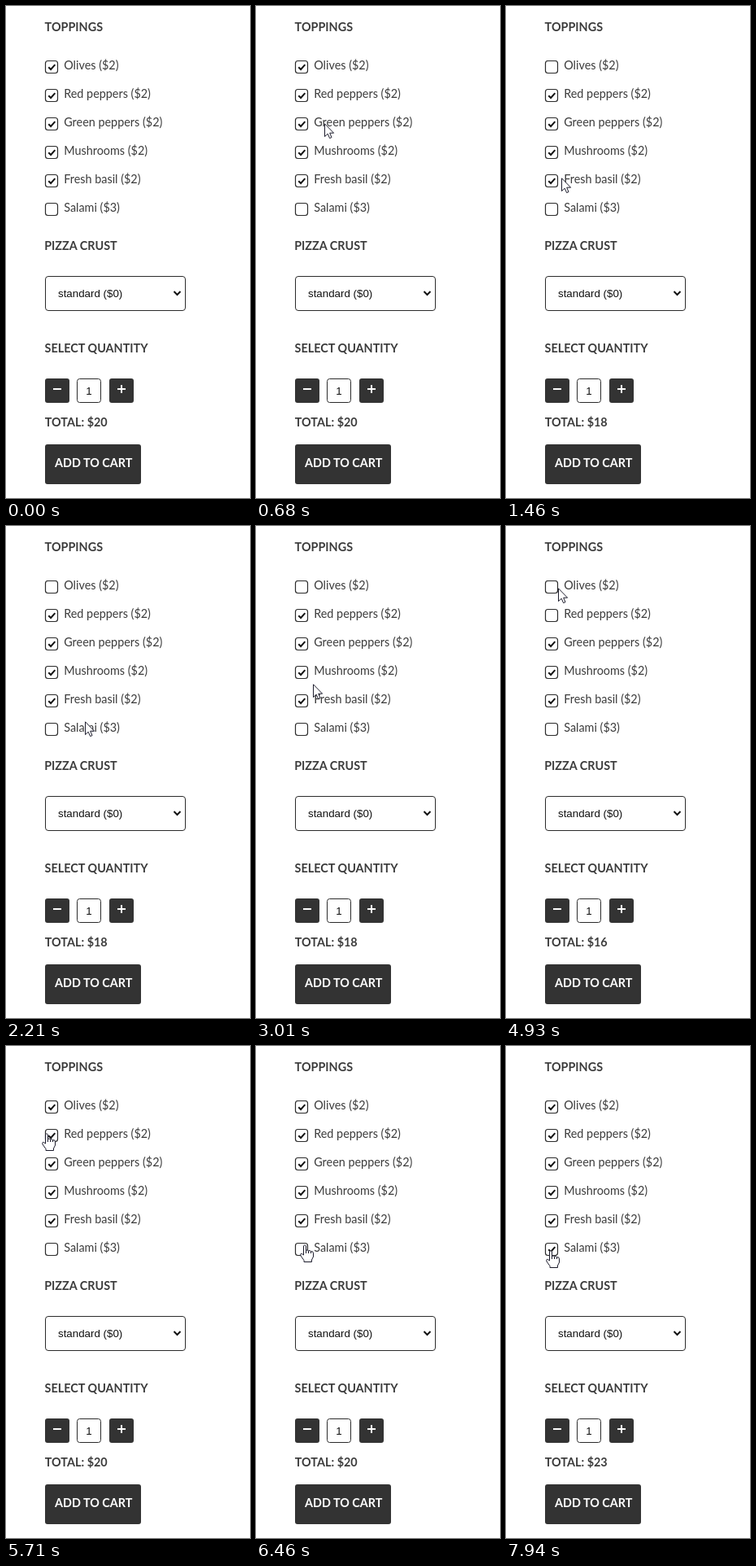
Animation of 300x605 px, one loop 8 s. Source, as an HTML page:

```html
<!DOCTYPE html>
<html lang="en">
<head>
<meta charset="utf-8">
<title>Pizza order form</title>
<style>
  html, body { margin: 0; width: 100%; height: 100%; overflow: hidden; background: #fff; }
  svg { display: block; width: 300px; height: 605px; }
  text { font: 14.4px Lato, sans-serif; fill: #3c3c3c; }
  .bold { font-weight: 700; }
  .light { fill: #fff; }
  .field { font: 13.333px "Liberation Sans", Arial, sans-serif; fill: #111; }
  .box { fill: #fff; stroke: #2b2b2b; }
  .dark { fill: #333; }
  .line { fill: none; stroke: #111; stroke-width: 2; }
  .sign { fill: none; stroke: #fff; stroke-width: 2; }
  .pointer { fill: #fff; stroke: #1c1c2c; stroke-linejoin: round; }
</style>
</head>
<body>
<svg viewBox="0 0 300 605">
  <text class="bold" x="47.6" y="31">TOPPINGS</text>
  <g id="list"></g>

  <text class="bold" x="47.2" y="300">PIZZA CRUST</text>
  <rect class="box" x="48.5" y="332.5" width="172" height="42" rx="3.5"/>
  <text class="field" x="64" y="358">standard ($0)</text>
  <path class="line" d="M206.5 351l4 4 4-4"/>

  <text class="bold" x="47.6" y="426">SELECT QUANTITY</text>
  <rect class="dark" x="48" y="458" width="30" height="30" rx="3"/>
  <path class="sign" d="M58 471h10"/>
  <rect class="box" x="87.5" y="458.5" width="29" height="29" rx="3"/>
  <text class="field" x="102" y="478" text-anchor="middle">1</text>
  <rect class="dark" x="127" y="458" width="30" height="30" rx="3"/>
  <path class="sign" d="M137 471h10M142 466v10"/>

  <text class="bold" id="total" x="47.8" y="517"></text>
  <rect class="dark" x="48" y="539" width="118" height="49" rx="3"/>
  <text class="bold light" x="60" y="567">ADD TO CART</text>

  <g id="cursor">
    <path id="arrow" class="pointer" d="M.5 .8V16.6L4.2 13.2 6.6 18.6 9 17.6 6.7 12.2H11.6Z"/>
    <g id="hand" class="pointer">
      <path d="M-1.5 13V2Q0-1 1.5 2V7.5Q3 6 4.5 7.8 6 6.8 7.5 8.6 10.5 8 10.5 11V15L8.5 19V21.5H-1V19.5L-5 14Q-6 9-1.5 13Z"/>
      <path d="M1.5 7v4m3-3v3m3-2v2"/>
    </g>
  </g>
</svg>
<script>
const LOOP = 8000, STEP = 75, BASE = 10;
const $ = id => document.getElementById(id);

const item = (name, price, on, ...clicks) => ({ name, price, on, clicks });
const items = [
  item('Olives', 2, true, 1050, 5150),
  item('Red peppers', 2, true, 3530, 5710),
  item('Green peppers', 2, true),
  item('Mushrooms', 2, true),
  item('Fresh basil', 2, true),
  item('Salami', 3, false, 6690)
];

// pointer moves: start time, then [step, x, y] stops;
// each move sets out from where the one before it ended
const moves = [
  [70, [0, 247, 567], [4, 125, 260], [10, 64, 86]],
  [900, [4, 62, 76]],
  [1460, [0, 68, 211], [6, 115, 537], [10, 97, 240]],
  [2360, [3, 60, 201]],
  [2760, [1, 77, 227], [8, 53, 112]],
  [3530, [3, 76, 161], [7, 152, 438], [10, 98, 411]],
  [4380, [0, 98, 410]],
  [4700, [3, 64, 76], [5, 54, 68], [10, 58, 95]],
  [5560, [2, 50, 107], [7, 78, 231]],
  [6250, [3, 60, 244], [4, 52, 250]],
  [6690, [1, 52, 243], [3, 38, 275], [8, 100, 507]],
  [7470, [4, 64, 264], [6, 55, 251]]
];

const rowY = i => 75 + 35 * i;

$('list').innerHTML = items.map(({ name, price }, i) => {
  const y = rowY(i);
  return `<rect class="box" x="48.5" y="${y - 7.5}" width="15" height="15" rx="3" stroke-width="1.2"/>
    <path class="line tick" d="M52.3 ${y + .2}l2.8 2.8 5.2-5.8"/>
    <text x="71.2" y="${y + 3}">${name} ($${price})</text>`;
}).join('');
const ticks = document.querySelectorAll('.tick');

function pointerAt(t) {
  const index = moves.filter(m => m[0] <= t).length - 1;
  if (index < 0) return null;
  const [start, ...stops] = moves[index];
  if (index > 0) {
    const [, x, y] = moves[index - 1].at(-1);
    stops.unshift([-1, x, y]);
  }
  const k = Math.min(stops.at(-1)[0], Math.floor((t - start) / STEP + 0.25));
  const next = stops.findIndex(s => s[0] >= k);
  const b = stops[next], a = stops[next - 1] || b;
  const f = a === b ? 0 : (k - a[0]) / (b[0] - a[0]);
  return [1, 2].map(n => Math.round(a[n] + (b[n] - a[n]) * f));
}

const show = (el, on) => el.setAttribute('visibility', on ? 'visible' : 'hidden');

function draw(t) {
  let total = BASE;
  items.forEach(({ price, on, clicks }, i) => {
    const flips = clicks.filter(c => c <= t).length;
    const checked = on !== (flips % 2 === 1);
    if (checked) total += price;
    show(ticks[i], checked);
  });
  $('total').textContent = `TOTAL: $${total}`;

  const p = pointerAt(t);
  const over = p && Math.abs(p[0] - 56) < 8 &&
    items.some((_, i) => Math.abs(p[1] - rowY(i)) < 8);
  show($('arrow'), p && !over);
  show($('hand'), over);
  if (p) $('cursor').setAttribute('transform', `translate(${p})`);
}

const begin = performance.now();
function tick() {
  draw((performance.now() - begin) % LOOP);
  requestAnimationFrame(tick);
}
tick();
</script>
</body>
</html>
```
